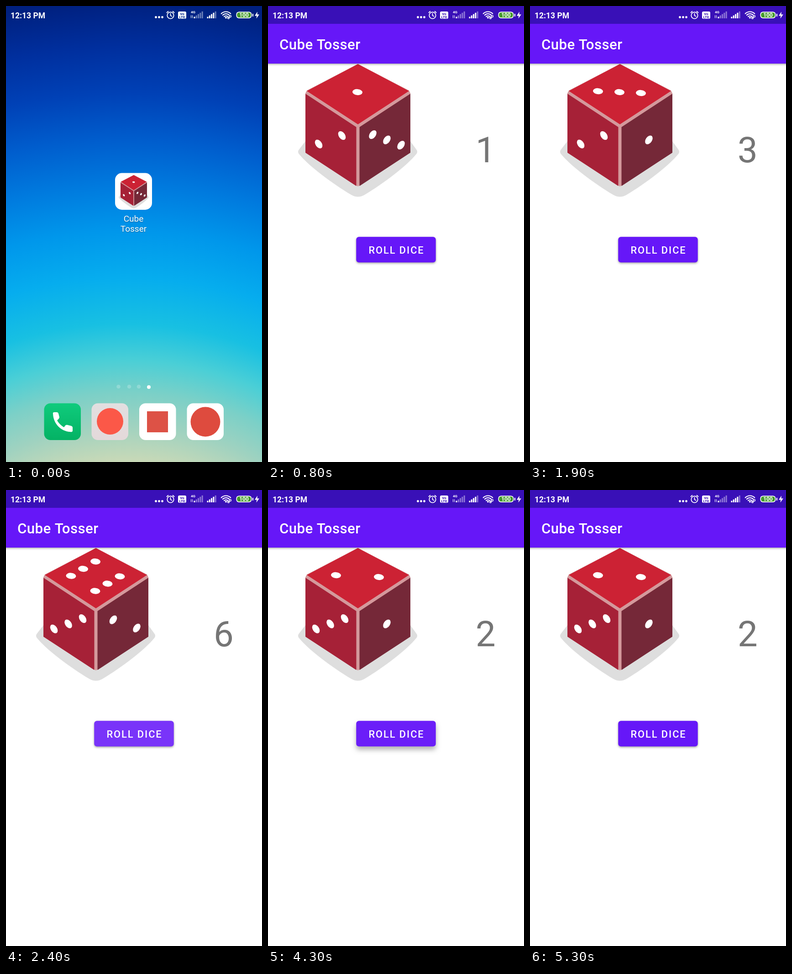
Write an HTML page with a canvas that moves like this. It is 561 px wide and 998 px high and loops after 5400 ms.

```html
<!DOCTYPE html>
<html lang="en">
<head>
<meta charset="utf-8">
<title>Cube Tosser</title>
<style>
html, body { margin: 0; width: 100%; height: 100%; overflow: hidden; background: #fff; }
canvas { display: block; }
</style>
</head>
<body>
<canvas id="stage" width="561" height="998"></canvas>
<script>
const ctx = document.getElementById('stage').getContext('2d');
const W = 561, H = 998, LOOP = 5400, STEP = 100;
const APP_READY = 800, OPEN_START = 190, OPEN_END = 600;

// Each tap shows its face value at once.
const taps = [
  { at: 1450, value: 3 }, { at: 2050, value: 6 }, { at: 2650, value: 2 },
  { at: 3200, value: 4 }, { at: 3750, value: 4 }, { at: 4250, value: 2 },
  { at: 4850, value: 2 }
];

const left2 = [[111, 302], [162, 283.5]];
const left3 = [[105, 304], [136.5, 293], [168, 281.5]];
const right1 = [[260.5, 293]];
const right2 = [[235, 284], [286.5, 302]];
const right3 = [[229.5, 281.5], [260.5, 293], [291.5, 304.5]];
const faces = {
  1: { top: [[196, 188.5]], left: left2, right: right3 },
  2: { top: [[149, 186.5], [243, 190.5]], left: left3, right: right1 },
  3: { top: [[149, 186.5], [196, 188.5], [243, 190.5]], left: left2, right: right1 },
  4: { top: [[193, 158.5], [146, 186.5], [246.5, 191], [199, 219]], left: left2, right: right1 },
  6: { top: [[196, 156.5], [169, 172.5], [142.5, 188], [249.5, 189], [222.5, 205], [195.5, 221]],
       left: left3, right: right2 }
};

const dieShadow = new Path2D('M82 296L68 314Q64 319 68 324C88 349 140 388 182 413Q197 422 212 413' +
  'C254 388 305 349 325 324Q329 319 325 314L312 296Z');
const handset = new Path2D('M103 893Q102 889 106 889L111 889Q114 889 115 892L117 900Q117 902 115 904' +
  'L112 907Q117 916 127 922L130 918Q132 916 135 917L143 919Q146 920 146 923L146 929' +
  'Q146 933 141 932C120 931 104 914 103 893Z');

const clamp = v => Math.max(0, Math.min(1, v));
const ramp = (t, a, b) => clamp((t - a) / (b - a));
const mix = (a, b, k) => a + (b - a) * k;

function poly(color, ...points) {
  ctx.fillStyle = color;
  ctx.beginPath();
  points.forEach(p => ctx.lineTo(...p));
  ctx.fill();
}

function disc(x, y, r, color) {
  ctx.fillStyle = color;
  ctx.beginPath();
  ctx.arc(x, y, r, 0, Math.PI * 2);
  ctx.fill();
}

function roundBox(x, y, w, h, r, color) {
  ctx.fillStyle = color;
  ctx.beginPath();
  ctx.roundRect(x, y, w, h, r);
  ctx.fill();
}

function line(...points) {
  ctx.beginPath();
  points.forEach(p => ctx.lineTo(...p));
  ctx.stroke();
}

function arc(x, y, r, from = 0, to = Math.PI * 2) {
  ctx.beginPath();
  ctx.arc(x, y, r, from, to);
  ctx.stroke();
}

function label(text, x, y, size, weight, color, align = 'left', spacing = 0) {
  ctx.font = `${weight} ${size}px Roboto, sans-serif`;
  ctx.letterSpacing = spacing + 'px';
  ctx.textAlign = align;
  ctx.fillStyle = color;
  ctx.fillText(text, x, y);
}

function linear(y0, y1, ...colors) {
  const g = ctx.createLinearGradient(0, y0, 0, y1);
  colors.forEach((c, i) => g.addColorStop(i / (colors.length - 1), c));
  return g;
}

function pips(points, rx, ry, degrees) {
  ctx.fillStyle = '#fff';
  for (const [x, y] of points) {
    ctx.beginPath();
    ctx.ellipse(x, y, rx, ry, degrees * Math.PI / 180, 0, Math.PI * 2);
    ctx.fill();
  }
}

function drawDie(value) {
  const face = faces[value];
  ctx.fillStyle = '#dedede';
  ctx.fill(dieShadow);
  poly('#d4999c', [197, 127], [309, 185], [312, 191], [312, 321], [197, 395], [82, 321], [82, 191], [85, 185]);
  poly('#cc2234', [197, 127], [309, 186], [197, 259], [85, 186]);
  poly('#a62137', [82, 192], [193.5, 265], [193.5, 394], [82, 321]);
  poly('#752838', [312, 192], [200.5, 265], [200.5, 394], [312, 321]);
  pips(face.top, 11, 6.6, 4);
  pips(face.left, 10.7, 6.8, 55);
  pips(face.right, 10.7, 6.8, -55);
}

function signal(x, bright) {
  for (let i = 0; i < 5; i++) {
    const h = 3.5 + i * 2.9;
    ctx.fillStyle = i < bright ? '#fff' : 'rgba(255,255,255,.42)';
    ctx.fillRect(x + i * 4.3, 27 - h, 3, h);
  }
}

function drawStatus(boxText) {
  label('12:13 PM', 10, 26.5, 17.5, 700, '#fff');
  [328.5, 335.5, 342.5].forEach(x => disc(x, 24.5, 2.4, '#fff'));

  ctx.strokeStyle = '#fff';
  ctx.lineCap = 'round';
  ctx.lineWidth = 1.8;
  arc(360.5, 20.5, 7.2);
  line([360.5, 16.5], [360.5, 21], [363.5, 22.5]);
  line([352.3, 14.5], [355.5, 11.8]);
  line([365.5, 11.8], [368.7, 14.5]);

  roundBox(377, 12, 18, 16, 3, '#fff');
  label('Vo', 386, 19.5, 8, 700, boxText, 'center');
  label('LTE', 386, 27, 8, 700, boxText, 'center');

  label('4G', 405, 16, 8, 700, '#fff');
  ctx.lineWidth = 1;
  line([405.5, 20.5], [405.5, 26]);
  line([408.5, 20.5], [408.5, 26]);
  signal(411.5, 1);
  signal(440.5, 4);

  ctx.lineWidth = 2.2;
  [5.5, 10, 14.5].forEach(r => arc(482, 27, r, -Math.PI * 0.75, -Math.PI * 0.25));
  disc(482, 25.5, 2, '#fff');
  ctx.lineWidth = 1.3;
  line([487.5, 26], [490, 23.5]);
  arc(491.5, 22.5, 2);
  arc(487.5, 26, 2);

  ctx.lineWidth = 1.6;
  roundBox(504.5, 12.5, 34, 14.5, 6, '#fff');
  roundBox(506.2, 14.2, 30.6, 11.1, 4.5, '#459a2c');
  ctx.fillStyle = '#fff';
  ctx.fillRect(540, 17, 2, 6);
  label('100', 521.5, 24, 12, 700, '#fff', 'center');
  poly('#fff', [551, 12.5], [545, 21.5], [549.5, 21.5], [548.5, 27.5], [555, 18.5], [550.5, 18.5]);
}

const wallpaper = (() => {
  const g = ctx.createRadialGradient(260, 1500, 502, 260, 1500, 1510);
  [[0, '#c9d9b7'], [.08, '#9fd2c0'], [.15, '#7cd0c7'], [.22, '#4bcfd6'], [.3, '#18c0e2'],
   [.4, '#06adee'], [.5, '#0097eb'], [.6, '#007ade'], [.7, '#005dcd'], [.8, '#0041b6'],
   [.9, '#002f9e'], [1, '#00207f']].forEach(s => g.addColorStop(...s));
  return g;
})();

function tile(x, color) {
  roundBox(x, 869.5, 80.5, 80.5, 14, color);
}

function drawIconDie() {
  ctx.save();
  ctx.translate(230.3, 338);
  ctx.scale(.252, .252);
  drawDie(1);
  ctx.restore();
}

function drawHome(scale) {
  ctx.fillStyle = wallpaper;
  ctx.fillRect(0, 0, W, H);
  ctx.save();
  ctx.translate(W / 2, H / 2);
  ctx.scale(scale, scale);
  ctx.translate(-W / 2, -H / 2);

  roundBox(239, 365.5, 81, 80.5, 15, '#fff');
  drawIconDie();
  ctx.shadowColor = 'rgba(0,0,0,.35)';
  ctx.shadowBlur = 2;
  ctx.shadowOffsetY = 1;
  label('Cube', 279.5, 472, 19, 400, '#fff', 'center');
  label('Tosser', 279.5, 493.5, 19, 400, '#fff', 'center');
  ctx.shadowColor = 'transparent';

  [246.5, 270, 291].forEach(x => disc(x, 833, 4.3, 'rgba(255,255,255,.22)'));
  disc(313, 834, 4, '#fff');

  tile(83.5, linear(870, 950, '#0fcb7c', '#04b264'));
  ctx.fillStyle = '#fff';
  ctx.fill(handset);
  tile(187.5, linear(870, 950, '#e2dfe0', '#e4d9da'));
  disc(228, 909, 29, '#fb5848');
  tile(292, '#fff');
  ctx.fillStyle = '#dd5246';
  ctx.fillRect(309, 887, 46, 46);
  tile(396.5, '#fff');
  disc(437, 910, 32.5, '#de4b3e');
  ctx.restore();
}

function drawOpening(p) {
  const x = mix(239, 0, p), y = mix(365, 0, p);
  const w = mix(81, W, p), h = mix(81, H, p);
  roundBox(x, y, w, h, 15 * (1 - ramp(p, 0, .65)), '#fff');
  const fade = 1 - ramp(p, .05, .45);
  if (!fade) return;
  ctx.save();
  ctx.globalAlpha = fade;
  ctx.translate(x + w / 2, y + h / 2);
  ctx.scale(w / 81, w / 81);
  ctx.translate(-279.5, -405.5);
  drawIconDie();
  ctx.restore();
}

function drawButton(age) {
  const lift = ramp(age, 0, 50) * (1 - ramp(age, 100, 190));
  const tint = .03 * ramp(age, 0, 50) + .26 * ramp(age, 50, 150);
  const glow = tint * (1 - ramp(age, 220, 450));
  ctx.save();
  ctx.shadowColor = `rgba(0,0,0,${mix(.36, .3, lift)})`;
  ctx.shadowBlur = mix(4, 11, lift);
  ctx.shadowOffsetY = mix(2, 7, lift);
  roundBox(193.3, 505.2, 174.4, 56, 6, '#6617f8');
  ctx.restore();
  if (glow > 0) roundBox(193.3, 505.2, 174.4, 56, 6, `rgba(255,255,255,${glow})`);
  label('ROLL DICE', 281.5, 542.3, 21.8, 500, '#fff', 'center', 1.95);
}

function drawApp(t) {
  const tap = taps.filter(s => s.at <= t).pop();
  const value = tap ? tap.value : 1;
  ctx.fillStyle = '#fff';
  ctx.fillRect(0, 0, W, H);
  drawDie(value);
  label(value, 477, 341.5, 77.9, 400, '#757575', 'center');
  drawButton(tap ? t - tap.at : Infinity);

  ctx.fillStyle = linear(126, 132, 'rgba(0,0,0,.3)', 'rgba(0,0,0,.08)', 'rgba(0,0,0,0)');
  ctx.fillRect(0, 126, W, 6);
  ctx.fillStyle = '#6617f8';
  ctx.fillRect(0, 39, W, 87);
  ctx.fillStyle = '#3910b7';
  ctx.fillRect(0, 0, W, 39);
  label('Cube Tosser', 25, 95, 31.2, 500, '#fff', 'left', .39);
}

function draw(now) {
  const t = Math.floor(now % LOOP / STEP) * STEP;
  if (t < APP_READY) {
    const p = Math.sin(ramp(t, OPEN_START, OPEN_END) * Math.PI / 2);
    drawHome(1 - .15 * p);
    if (p > 0) drawOpening(p);
    drawStatus('#00258c');
  } else {
    drawApp(t);
    drawStatus('#3910b7');
  }
}

const start = performance.now();
function tick() {
  draw(performance.now() - start);
  requestAnimationFrame(tick);
}
tick();
</script>
</body>
</html>
```
